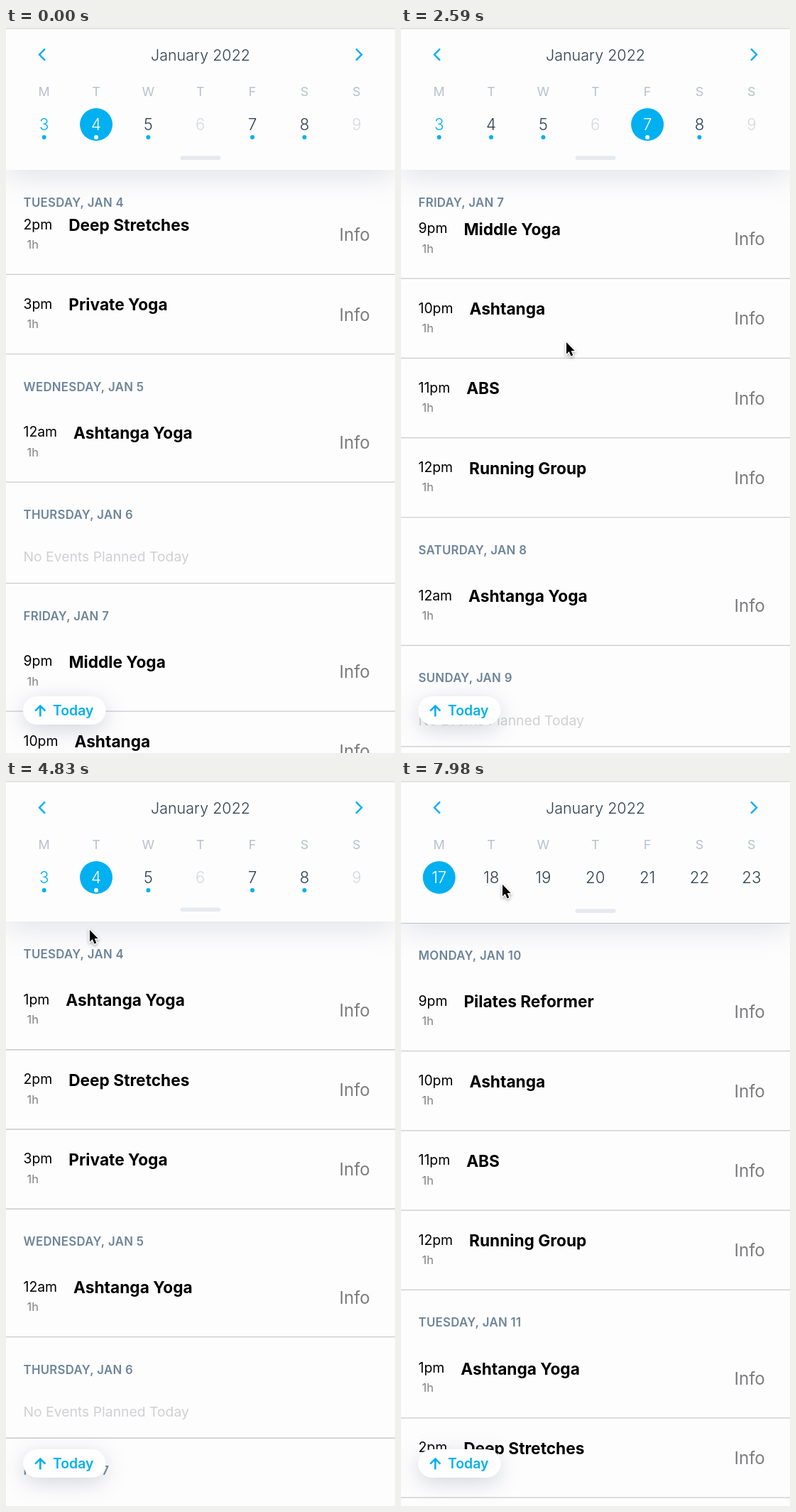
Recreate the animation shown at these times as an HTML page with a canvas. Size 548 px wide and 1022 px high, loop 8 s.

```html
<!DOCTYPE html>
<html lang="en">
<head>
<meta charset="utf-8">
<title>Agenda calendar</title>
<style>
  html, body { margin: 0; width: 100%; height: 100%; overflow: hidden; background: #fefdfe; }
  canvas { display: block; width: 548px; height: 1022px; }
</style>
</head>
<body>
<canvas id="stage"></canvas>
<script>
const W = 548, H = 1022, LOOP = 8000, STEP = 70;
const BG = '#fefdfe', BLUE = '#00b0f0', DARK = '#2d4150', FADED = '#d5dade', LINE = '#cacacd';
const HEAD = 68.2, ROW = 112.25, EMPTY = 74.4;
const CLOSED = 200, OPEN_PULL = 355, SLOP = 17;

const canvas = document.getElementById('stage');
const ctx = canvas.getContext('2d');
const dpr = window.devicePixelRatio || 1;
canvas.width = W * dpr;
canvas.height = H * dpr;

// Agenda by day of the month; a day without events has no entry
const dayNames = ['SUN', 'MON', 'TUES', 'WEDNES', 'THURS', 'FRI', 'SATUR'];
const evening = '10pm Ashtanga,11pm ABS,12pm Running Group';
const afternoon = '1pm Ashtanga Yoga,2pm Deep Stretches,3pm Private Yoga';
const events = {
  4: afternoon, 5: '12am Ashtanga Yoga', 7: '9pm Middle Yoga,' + evening, 8: '12am Ashtanga Yoga',
  10: '9pm Pilates Reformer,' + evening, 11: afternoon, 12: '12am Last Yoga',
};

const sections = [];
for (let day = 4, top = 0; day <= 12; day++) {
  const items = events[day] ? events[day].split(',') : [];
  const height = HEAD + (items.length * ROW || EMPTY);
  sections.push({ day, items, top, height, title: `${dayNames[(day + 5) % 7 + 1] || 'SUN'}DAY, JAN ${day}` });
  top += height;
}
for (const s of sections) s.title = `${dayNames[(s.day + 5) % 7]}DAY, JAN ${s.day}`;
const sectionOf = day => sections.find(s => s.day === day);
const isMarked = day => day === 0 || day === 3 || day in events;
const isDimmed = day => !!sectionOf(day) && !isMarked(day);

const clamp = (v, lo, hi) => Math.min(hi, Math.max(lo, v));
const mix = (a, b, k) => a + (b - a) * k;
const span = (t, from, to) => clamp((t - from) / (to - from), 0, 1);
const easeOut = (t, from, to) => 1 - (1 - span(t, from, to)) ** 1.62;
const smooth = (t, from, to) => { const k = span(t, from, to); return k * k * (3 - 2 * k); };
const fade = (t, down, up) => 1 - 0.77 * (span(t, down, down + 70) - span(t, up, up + 140));

// Pointer glides: start, end, x, y
const glides = [
  [840, 1050, 217, 808], [1190, 1820, 220, 505],
  [1960, 2170, 257, 784], [2170, 2590, 233, 443],
  [2660, 2940, 335, 119], [2940, 3080, 280, 191], [3290, 3903, 279, 390],
  [4130, 4620, 118, 210], [5040, 5390, 422, 138], [5740, 6090, 500, 37],
  [6440, 6650, 484, 134], [6720, 7280, 143, 146],
];
function pointerAt(t) {
  let x = 216, y = 681;
  for (const [from, to, px, py] of glides) {
    const k = easeOut(t, from, to);
    x = mix(x, px, k);
    y = mix(y, py, k);
  }
  return { x, y };
}

// The list follows the pointer while dragged, and jumps or glides after taps
function scrollAt(t) {
  const drag = from => Math.max(0, from - SLOP - pointerAt(t).y);
  if (t < 1190) return 145.5;
  if (t <= 1820) return 145.5 + drag(808);
  if (t <= 2170) return 431.5;
  if (t <= 2590) return 431.5 + drag(784);
  if (t < 4760) return 755.5;
  const saturday = sectionOf(8).top, monday = sectionOf(10).top;
  return saturday * smooth(t, 5440, 5820) + (monday - saturday) * smooth(t, 6160, 6370);
}

// How far the calendar is pulled down: drag, settle open, spring closed
function pullAt(t) {
  if (t < 3290) return 0;
  if (t <= 3903) return Math.max(0, pointerAt(t).y - 191 - SLOP);
  if (t <= 4690) return mix(OPEN_PULL, 182, Math.exp((3903 - t) / 55));
  const d = t - 4690;
  return OPEN_PULL * Math.exp(-d / 40) * Math.cos(d / 80);
}

function selectedAt(t, scroll) {
  if (t < 4760) return sections.find(s => s.top + s.height > scroll).day;
  if (t < 5460) return 4;
  if (t < 6230) return 8;
  return t < 7280 ? 10 : 17;
}

const pageAt = t => t < 6230 ? 0 : 1 + easeOut(t, 6720, 7350);

function text(str, x, y, size, weight, color, align = 'left', spacing = 0) {
  ctx.font = `${weight} ${size}px Inter, sans-serif`;
  ctx.letterSpacing = spacing + 'px';
  ctx.textAlign = align;
  ctx.fillStyle = color;
  ctx.fillText(str, x, y);
  return ctx.measureText(str).width;
}
function box(x, y, w, h, color, r = 0) {
  ctx.fillStyle = color;
  ctx.beginPath();
  ctx.roundRect(x, y, w, h, r);
  ctx.fill();
}
function disc(x, y, r, color) {
  ctx.fillStyle = color;
  ctx.beginPath();
  ctx.arc(x, y, r, 0, 7);
  ctx.fill();
}
function stroke(path, color, width) {
  ctx.strokeStyle = color;
  ctx.lineWidth = width;
  ctx.stroke(new Path2D(path));
}
// Runs a drawing with its own opacity or shadow
function layer(settings, draw) {
  ctx.save();
  Object.assign(ctx, settings);
  draw();
  ctx.restore();
}
const shadow = (alpha, blur, y) =>
  ({ shadowColor: `rgba(105,125,140,${alpha})`, shadowBlur: blur * dpr, shadowOffsetY: y * dpr });
const rule = y => box(0, y - 0.5, W, 1.4, LINE);
const column = i => 53.7 + 73.35 * i;

function drawItem(item, y) {
  const [, time, name] = item.match(/^(\S+) (.+)$/);
  const w = text(time, 24.5, y + 48.6, 19.4, 400, '#000');
  text(name, 24.5 + w + 23, y + 51.2, 22.7, 700, '#000');
  text('1h', 29.5, y + 76, 16.4, 400, '#808080');
  text('Info', 512.8, y + 65.4, 24.1, 400, '#7c7c7e', 'right');
  rule(y + ROW);
}

function drawList(top, scroll, press) {
  for (const s of sections) {
    const y = top + s.top - scroll;
    if (y > H || y + s.height < top) continue;
    s.items.forEach((item, i) => {
      const pressed = s.day === 7 && i === 1;
      layer({ globalAlpha: pressed ? press : 1 }, () => drawItem(item, y + HEAD + i * ROW));
    });
    if (!s.items.length) {
      text('No Events Planned Today', 24.5, y + HEAD + 44.2, 19.35, 400, '#d0d0d2');
      rule(y + s.height);
    }
    // Sticky day header, pushed up by the next one
    const hy = Math.max(y, Math.min(top, y + s.height - HEAD));
    box(0, hy + 1, W, HEAD - 2, BG);
    text(s.title, 24.5, hy + 52.2, 16.8, 600, '#6d8599', 'left', 0.3);
  }
}

function drawWeek(first, y, dx, selected) {
  for (let i = 0; i < 7; i++) {
    const day = first + i, x = column(i) + dx;
    const on = day === selected;
    const label = (day + 30) % 31 + 1;
    const color = on ? '#fff' : day === 3 ? BLUE : label !== day || isDimmed(day) ? FADED : DARK;
    if (on) disc(x, y, 23, BLUE);
    text(label, x, y + 8, 22.2, 300, color, 'center');
    if (isMarked(day)) disc(x, y + 18, 3, on ? '#fff' : BLUE);
  }
}

function drawPanel(bottom, pull, page, selected, arrow) {
  layer(shadow(0.2, 40, 10), () => box(0, 0, W, bottom, BG));
  box(0, 0, W, 1.4, '#dcdce0');
  text('January 2022', 274, 45.5, 21.5, 300, DARK, 'center');
  stroke('M55 29.3L47 37.5 55 45.7', BLUE, 2.4);
  layer({ globalAlpha: arrow }, () => stroke('M493 29.3L501 37.5 493 45.7', BLUE, 2.4));
  [...'MTWTFSS'].forEach((d, i) => text(d, column(i), 96.4, 17.9, 400, '#b6c1cd', 'center'));

  ctx.save();
  ctx.beginPath();
  ctx.rect(0, 105, W, bottom - 139);
  ctx.clip();
  if (pull > 0)
    for (let r = 0; r < 6; r++) drawWeek(7 * r - 4, 143 + 65.5 * r, 0, selected);
  // The single week row fades out over the month as it opens
  const alpha = clamp(1 - pull / 142.4, 0, 1);
  if (alpha > 0) layer({ globalAlpha: alpha }, () => {
    box(0, 105, W, 61, BG);
    const week = Math.floor(page);
    for (const k of [week, week + 1]) drawWeek(3 + 7 * k, 136, (k - page) * W, selected);
  });
  ctx.restore();
  box(245.5, bottom - 19.7, 57, 5.7, '#e6eaef', 2.8);
}

function drawToday() {
  layer(shadow(0.3, 30, 7), () => box(24, 942, 116.5, 40, '#fefefe', 20));
  stroke('M48.3 970.5V956M41.2 962.6L48.3 955.5 55.4 962.6', BLUE, 2.6);
  text('Today', 66, 969, 19.4, 600, BLUE);
}

function drawPointer({ x, y }) {
  const shape = new Path2D('M0 0V16.5L3.8 13 6.5 19.4 9.3 18.2 6.6 12H11.6Z');
  ctx.save();
  ctx.translate(x, y);
  layer({ shadowColor: 'rgba(0,0,0,.35)', shadowBlur: 4 * dpr, shadowOffsetY: 2 * dpr,
    strokeStyle: '#fff', lineWidth: 2.4 }, () => ctx.stroke(shape));
  ctx.fillStyle = '#000';
  ctx.fill(shape);
  ctx.restore();
}

function render(now) {
  const t = Math.floor((now % LOOP) / STEP) * STEP;
  const scroll = scrollAt(t), pull = pullAt(t), bottom = CLOSED + pull;
  ctx.setTransform(dpr, 0, 0, dpr, 0, 0);
  box(0, 0, W, H, BG);
  drawList(bottom, scroll, fade(t, 2100, 2240));
  drawPanel(bottom, pull, pageAt(t), selectedAt(t, scroll), fade(t, 6020, 6230));
  drawToday();
  if (t >= 840) drawPointer(pointerAt(t));
}

const start = performance.now();
function loop() {
  render(performance.now() - start);
  requestAnimationFrame(loop);
}
loop();
</script>
</body>
</html>
```
